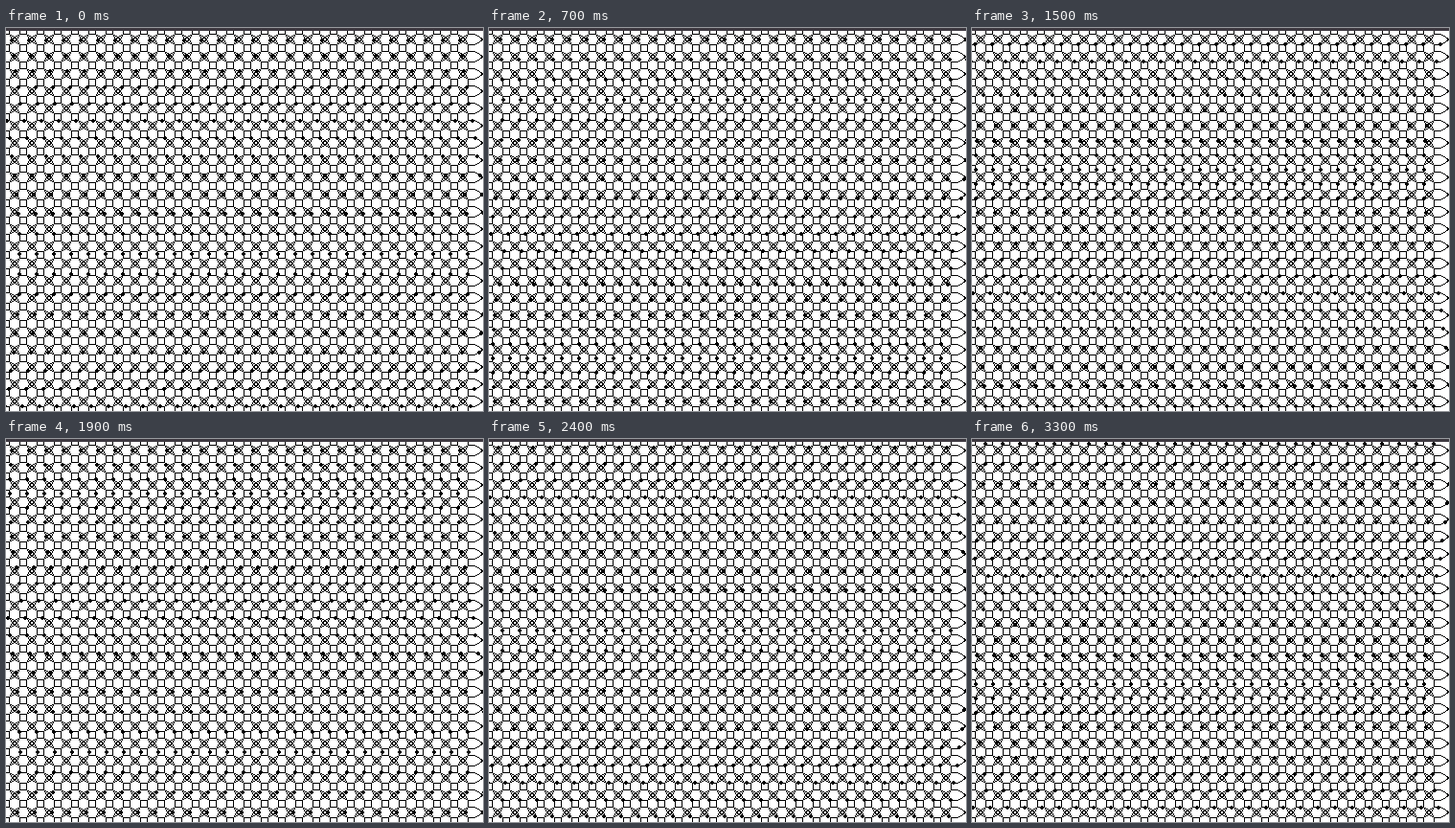
An HTML page with a canvas for the animation above (3.4 s loop, 498 px wide and 400 px high).

```html
<!DOCTYPE html>
<html lang="en">
<head>
<meta charset="utf-8">
<title>Orbiting dots</title>
<style>
  html, body { margin: 0; width: 100%; height: 100%; overflow: hidden; background: #fff; }
  canvas { display: block; }
</style>
</head>
<body>
<canvas id="stage" width="498" height="400"></canvas>
<script>
const WIDTH = 498, HEIGHT = 400;
const SPACING = 18, TOP = 3, RADIUS = 14.5;
const COLUMNS = 28, ROWS = 23;
const STEP_MS = 100, STEPS = 34;
const START_ANGLE = -160, ROW_ANGLE = 12, STEP_ANGLE = 16; // degrees

const ctx = document.getElementById('stage').getContext('2d');

function eachCenter(draw) {
  for (let row = 0; row < ROWS; row++) {
    for (let col = 0; col < COLUMNS; col++) {
      draw(col * SPACING, TOP + row * SPACING, row);
    }
  }
}

// Crisp one-pixel circle, mirrored from a single octant.
function plotCircle(g, cx, cy) {
  for (let a = 0.5; a < RADIUS * Math.SQRT1_2 + 0.5; a++) {
    const b = Math.round(Math.sqrt(RADIUS ** 2 - a * a) - 0.5) + 0.5;
    for (const sx of [-1, 1]) {
      for (const sy of [-1, 1]) {
        g.fillRect(cx + sx * a - 0.5, cy + sy * b - 0.5, 1, 1);
        g.fillRect(cx + sx * b - 0.5, cy + sy * a - 0.5, 1, 1);
      }
    }
  }
}

function plotDot(x, y) {
  x = Math.round(x);
  y = Math.round(y);
  ctx.fillRect(x - 2, y - 1, 4, 2);
  ctx.fillRect(x - 1, y - 2, 2, 4);
}

function makeBackground() {
  const canvas = document.createElement('canvas');
  canvas.width = WIDTH;
  canvas.height = HEIGHT;
  const g = canvas.getContext('2d');
  g.fillStyle = '#fff';
  g.fillRect(0, 0, WIDTH, HEIGHT);
  g.fillStyle = '#000';
  eachCenter((x, y) => plotCircle(g, x, y));
  return canvas;
}

// The motion rests at steps 24 and 30 before jumping on.
function heldStep(ms) {
  const step = Math.floor(ms / STEP_MS) % STEPS;
  if (step > 24 && step < 30) return 24;
  return step === 31 ? 30 : step;
}

const background = makeBackground();
const startTime = performance.now();

function render() {
  const step = heldStep(performance.now() - startTime);
  ctx.drawImage(background, 0, 0);
  ctx.fillStyle = '#000';
  eachCenter((x, y, row) => {
    const angle = (START_ANGLE + ROW_ANGLE * row + STEP_ANGLE * step) * Math.PI / 180;
    plotDot(x + RADIUS * Math.cos(angle), y + RADIUS * Math.sin(angle));
  });
  ctx.fillStyle = '#3d3840';
  ctx.fillRect(0, 0, WIDTH, TOP);
  requestAnimationFrame(render);
}
render();
</script>
</body>
</html>
```
